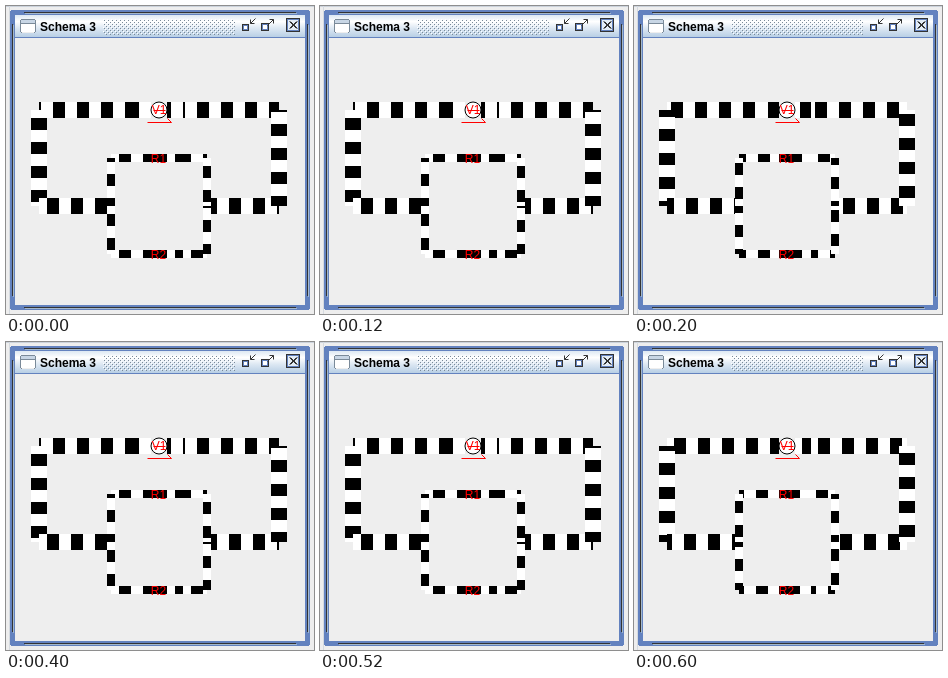
An HTML page with a canvas for the animation above (0.8 s loop, 308x308 px).

```html
<!DOCTYPE html>
<html>
<head>
<meta charset="utf-8">
<style>
html, body { margin: 0; width: 100%; height: 100%; overflow: hidden; background: #eee; }
canvas { display: block; }
</style>
</head>
<body>
<canvas id="stage" width="308" height="308"></canvas>
<script>
const ctx = document.getElementById('stage').getContext('2d');
const BLUE = '#6382bf', PALE = '#a3b8cc', GREY = '#7a8a99', INK = '#333', RED = '#f00';
const DASH = 12, PERIOD = 2 * DASH, STEP = 200;

// Dash positions per step; wires painted later have moved on a little.
const EARLY = [14, 4, 14, 7];
const LATE = [16, 5, 16, 7];

function box(x, y, w, h, color) {
  ctx.fillStyle = color;
  ctx.fillRect(x, y, w, h);
}

function line(color, ...pts) {
  ctx.strokeStyle = color;
  ctx.lineWidth = 1;
  ctx.beginPath();
  for (let i = 0; i < pts.length; i += 2) ctx.lineTo(pts[i] + 0.5, pts[i + 1] + 0.5);
  ctx.stroke();
}

function label(text, x, y, font, color, align) {
  ctx.font = font + ' "Liberation Sans", Arial, sans-serif';
  ctx.textAlign = align;
  ctx.fillStyle = color;
  ctx.fillText(text, x, y);
}

// Dashes run from (x1, y1) to (x2, y2), or back when the phase is negative.
function wire(width, phase, x1, y1, x2, y2) {
  ctx.lineWidth = width;
  ctx.beginPath();
  ctx.moveTo(x1, y1);
  ctx.lineTo(x2, y2);
  ctx.strokeStyle = '#fff';
  ctx.stroke();
  ctx.setLineDash([DASH, DASH]);
  ctx.lineDashOffset = PERIOD - phase;
  ctx.strokeStyle = '#000';
  ctx.stroke();
  ctx.setLineDash([]);
}

function border() {
  box(0, 0, 308, 308, '#eee');
  box(0, 0, 308, 1, '#ccd3dc');
  box(3, 0, 1, 308, '#d5dae0');
  box(5, 4, 298, 300, BLUE);
  box(4, 5, 300, 298, BLUE);
  for (const [i, color] of [[0, INK], [1, PALE]]) {
    box(18 + i, 6 + i, 272, 1, color);
    box(6 + i, 18 + i, 1, 272, color);
    box(301 + i, 18 + i, 1, 272, color);
    box(18 + i, 301 + i, 272, 1, color);
  }
  box(9, 9, 290, 290, '#eee');
}

function squareIcon(x, y, size) {
  box(x, y, size, size, INK);
  box(x + 1, y + 1, size - 2, size - 2, BLUE);
  box(x + 2, y + 2, size - 4, size - 4, '#fff');
}

function titleBar() {
  const g = ctx.createLinearGradient(0, 9, 0, 31);
  g.addColorStop(0, '#dde8f3');
  g.addColorStop(0.3, '#fff');
  g.addColorStop(0.6, '#dde8f3');
  g.addColorStop(1, '#b8cfe5');
  box(9, 9, 290, 22, g);
  box(9, 31, 290, 1, BLUE);

  for (let y = 13; y < 28; y += 2)
    for (let x = 97 + (y - 13) % 4; x < 229; x += 4) {
      box(x, y, 1, 1, '#fff');
      box(x + 1, y + 1, 1, 1, GREY);
    }

  box(15, 13, 14, 14, GREY);
  box(14, 14, 16, 12, GREY);
  box(15, 14, 14, 3, '#c8d6e5');
  box(15, 18, 14, 8, '#fff');
  box(16, 26, 12, 1, '#eee');
  label('Schema 3', 34, 25, 'bold 12px', '#000', 'left');

  squareIcon(236, 18, 7);
  line(INK, 249, 12, 244, 17);
  line(INK, 244, 13, 244, 17, 248, 17);
  squareIcon(255, 17, 8);
  line(INK, 261, 19, 267, 13);
  line(INK, 263, 13, 267, 13, 267, 17);

  box(280, 12, 14, 14, INK);
  box(281, 13, 12, 12, BLUE);
  box(282, 14, 10, 10, '#e4edf6');
  for (const s of [0, 1]) {
    line(INK, 283 + s, 15, 290 + s, 22);
    line(INK, 283 + s, 22, 290 + s, 15);
  }
}

function source() {
  ctx.beginPath();
  ctx.arc(153, 104, 8, 0, 2 * Math.PI);
  ctx.fillStyle = '#fff';
  ctx.fill();
  ctx.strokeStyle = '#000';
  ctx.lineWidth = 1;
  ctx.stroke();
  label('V1', 153, 108, '12px', RED, 'center');
  line(RED, 147, 104, 159, 104);
  line(RED, 141, 116, 165, 116, 161, 112);
}

function resistor(name, y, back) {
  wire(8, back, 129, y, 145, y);
  wire(8, back, 161, y, 177, y);
  box(145, y - 4, 16, 8, '#000');
  label(name, 152.5, y + 5, '12px', RED, 'center');
}

function circuit(early, late) {
  const back = -late;

  wire(16, early, 33, 104, 129, 104);
  wire(16, early, 177, 104, 273, 104);
  wire(16, early, 273, 200, 201, 200);
  wire(16, early, 273, 104, 273, 200);
  wire(16, back, 33, 104, 33, 200);
  wire(16, back, 33, 200, 105, 200);

  wire(8, late, 201, 152, 177, 152);
  wire(8, back, 105, 152, 129, 152);
  wire(8, back, 177, 248, 201, 248);
  wire(8, back, 105, 248, 129, 248);
  wire(8, back, 201, 152, 201, 200);
  wire(8, early, 201, 200, 201, 248);
  wire(8, late, 105, 152, 105, 200);
  wire(8, back, 105, 200, 105, 248);

  wire(16, late, 129, 104, 145, 104);
  wire(16, late, 161, 104, 177, 104);
  source();
  resistor('R1', 152, back);
  resistor('R2', 248, back);
}

function tick() {
  const step = Math.floor(performance.now() / STEP) % EARLY.length;
  border();
  titleBar();
  circuit(EARLY[step], LATE[step]);
  requestAnimationFrame(tick);
}
tick();
</script>
</body>
</html>
```
